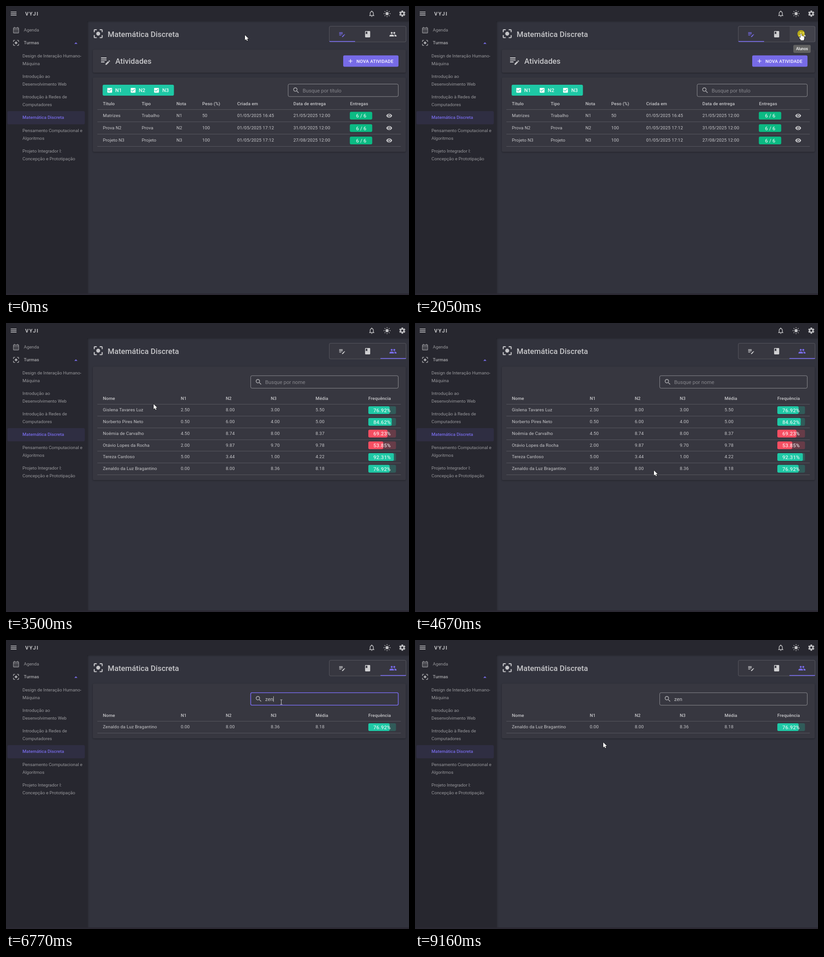
An HTML page with a canvas that plays this animation: 882 by 635 pixels, repeating every 9.2 s.

```html
<!DOCTYPE html>
<html lang="pt-BR">
<head>
<meta charset="utf-8">
<title>Matemática Discreta</title>
<style>
html, body { margin: 0; width: 100%; height: 100%; overflow: hidden; background: #32333d; }
canvas { display: block; }
</style>
</head>
<body>
<canvas id="stage" width="882" height="635"></canvas>
<script>
const ctx = document.getElementById('stage').getContext('2d');
const LOOP = 9200;
const BG = '#32333d', DARK = '#27272f', SURFACE = '#373740';
const PRIMARY = '#776be7', TEAL = '#1ec8a5', RED = '#f64e62', GREEN = '#0bba83';
const white = a => `rgba(255,255,255,${a})`;
const TEXT = white(.72), MUTED = white(.52), LINE = white(.16);

const ICONS = {
  menu: 'M3 18h18v-2H3zM3 13h18v-2H3zM3 6v2h18V6z',
  bell: 'M12 22c1.1 0 2-.9 2-2h-4c0 1.1.9 2 2 2zm6-6v-5c0-3.07-1.63-5.64-4.5-6.32V4c0-.83-.67-1.5-1.5-1.5s-1.5.67-1.5 1.5v.68C7.64 5.36 6 7.92 6 11v5l-2 2v1h16v-1l-2-2zm-2 1H8v-6c0-2.48 1.51-4.5 4-4.5s4 2.02 4 4.5v6z',
  calendar: 'M19 4h-1V2h-2v2H8V2H6v2H5c-1.1 0-2 .9-2 2v14c0 1.1.9 2 2 2h14c1.1 0 2-.9 2-2V6c0-1.1-.9-2-2-2zm0 16H5V10h14zM5 8V6h14v2zM7 12h2v2H7zM11 12h2v2h-2zM15 12h2v2h-2zM7 16h2v2H7zM11 16h2v2h-2zM15 16h2v2h-2z',
  focus: 'M12 8c-2.21 0-4 1.79-4 4s1.79 4 4 4 4-1.79 4-4-1.79-4-4-4zm-7 7H3v4c0 1.1.9 2 2 2h4v-2H5zM5 5h4V3H5c-1.1 0-2 .9-2 2v4h2zm14-2h-4v2h4v4h2V5c0-1.1-.9-2-2-2zm0 16h-4v2h4c1.1 0 2-.9 2-2v-4h-2z',
  note: 'M3 10h11v2H3zM3 8h11V6H3zM3 16h7v-2H3zM18.01 12.87l.71-.71c.39-.39 1.02-.39 1.41 0l.71.71c.39.39.39 1.02 0 1.41l-.71.71zM17.3 13.58l-5.3 5.3V21h2.12l5.3-5.3z',
  book: 'M18 2H6c-1.1 0-2 .9-2 2v16c0 1.1.9 2 2 2h12c1.1 0 2-.9 2-2V4c0-1.1-.9-2-2-2zM6 4h5v8l-2.5-1.5L6 12z',
  people: 'M16 11c1.66 0 3-1.34 3-3s-1.34-3-3-3-3 1.34-3 3 1.34 3 3 3zm-8 0c1.66 0 3-1.34 3-3S9.66 5 8 5 5 6.34 5 8s1.34 3 3 3zm0 2c-2.33 0-7 1.17-7 3.5V19h14v-2.5c0-2.33-4.67-3.5-7-3.5zm8 0c-.29 0-.62.02-.97.05 1.16.84 1.97 1.97 1.97 3.45V19h6v-2.5c0-2.33-4.67-3.5-7-3.5z',
  search: 'M15.5 14h-.79l-.28-.27C15.41 12.59 16 11.11 16 9.5 16 5.91 13.09 3 9.5 3S3 5.91 3 9.5 5.91 16 9.5 16c1.61 0 3.09-.59 4.23-1.57l.27.28v.79l5 4.99L20.49 19zm-6 0C7.01 14 5 11.99 5 9.5S7.01 5 9.5 5 14 7.01 14 9.5 11.99 14 9.5 14z',
  eye: 'M12 4.5C7 4.5 2.73 7.61 1 12c1.73 4.39 6 7.5 11 7.5s9.27-3.11 11-7.5c-1.73-4.39-6-7.5-11-7.5zM12 17c-2.76 0-5-2.24-5-5s2.24-5 5-5 5 2.24 5 5-2.24 5-5 5zm0-8c-1.66 0-3 1.34-3 3s1.34 3 3 3 3-1.34 3-3-1.34-3-3-3z',
  check: 'M19 3H5c-1.1 0-2 .9-2 2v14c0 1.1.9 2 2 2h14c1.1 0 2-.9 2-2V5c0-1.1-.9-2-2-2zm-9 14l-5-5 1.41-1.41L10 14.17l7.59-7.59L19 8z',
  plus: 'M19 13h-6v6h-2v-6H5v-2h6V5h2v6h6z',
  up: 'M7 14.5l5-5 5 5z',
  arrow: 'M0 0V11.2L2.6 8.8 4.3 12.6 6.2 11.8 4.5 8.1H8z',
  hand: 'M-1.3 1.2C-1.3-.4 1.1-.4 1.1 1.2V5C1.3 4.2 3.2 4.3 3.3 5.4 3.7 4.7 5.2 4.9 5.3 6 5.8 5.4 7 5.8 7 6.8V10C7 12 6 12.6 5.8 14.6H-.6C-.8 12.8-3 11-4 9-4.4 7.8-2.6 7.2-1.3 9z'
};
for (const k in ICONS) ICONS[k] = new Path2D(ICONS[k]);

// [time, x, y]
const PATH = [
  [0, 523, 64], [40, 523, 64], [250, 640, 69], [400, 752, 70], [600, 818.5, 66.5], [760, 838, 63], [930, 845, 61],
  [2810, 845, 61], [3100, 750, 110], [3400, 420, 165], [3690, 213, 191], [3950, 460, 163], [4120, 770, 163],
  [4230, 836, 185], [4400, 690, 262], [4560, 546, 314], [4670, 523, 324],
  [4800, 523, 324], [5000, 545, 270], [5200, 592, 160], [5360, 603, 136],
  [6750, 603, 136], [7000, 480, 162], [7250, 265, 190], [7450, 203, 192],
  [7640, 203, 192], [7900, 235, 189], [8270, 309, 185], [8550, 350, 185], [8670, 355, 186],
  [9100, 355, 186], [9130, 384, 206], [9160, 412, 225], [9200, 412, 225]
];
const PRESSES = [[2050, 2130], [5400, 5470], [7660, 8570], [8880, 8920]];
const SWITCH = 2095, FOCUS = 5400, BLUR = 7660, CLEAR = 8880;
const TABS = [['note', 735.5, ''], ['book', 791.5, 'Frequência'], ['people', 847, 'Alunos']];

const TASKS = [
  ['Matrizes', 'Trabalho', 'N1', '50', '01/05/2025 16:45', '21/05/2025 12:00'],
  ['Prova N2', 'Prova', 'N2', '100', '01/05/2025 17:12', '31/05/2025 12:00'],
  ['Projeto N3', 'Projeto', 'N3', '100', '01/05/2025 17:12', '27/08/2025 12:00']
];
const STUDENTS = [
  ['Gislena Tavares Luz', '2.50', '8.00', '3.00', '5.50', 76.92],
  ['Norberto Pires Neto', '0.50', '6.00', '4.00', '5.00', 84.62],
  ['Noêmia de Carvalho', '4.50', '8.74', '8.00', '8.37', 69.23],
  ['Otávio Lopes da Rocha', '2.00', '9.87', '9.70', '9.78', 53.85],
  ['Tereza Cardoso', '5.00', '3.44', '1.00', '4.22', 92.31],
  ['Zenaldo da Luz Bragantino', '0.00', '8.00', '8.36', '8.18', 76.92]
];
const TASK_COLS = [212, 297, 373, 429.5, 506, 629, 753];
const STUDENT_COLS = [212, 382.5, 481, 579.5, 677.5, 793];
let hits = [];

const clamp = v => Math.max(0, Math.min(1, v));

function bezier(p, x1, y1, x2, y2) {
  const at = (s, a, b) => 3 * a * s * (1 - s) ** 2 + 3 * b * s * s * (1 - s) + s ** 3;
  let lo = 0, hi = 1;
  for (let i = 0; i < 20; i++) {
    const mid = (lo + hi) / 2;
    if (at(mid, x1, x2) < p) lo = mid; else hi = mid;
  }
  return at(lo, y1, y2);
}

function pointer(t) {
  let i = 0;
  while (i < PATH.length - 2 && t >= PATH[i + 1][0]) i++;
  const still = (a, b) => a[1] === b[1] && a[2] === b[2];
  const slope = (k, d) => {
    const a = PATH[k - 1], b = PATH[k], c = PATH[k + 1];
    if (!a || !c || still(a, b) || still(b, c)) return 0;
    return (b[d] - a[d]) * (c[d] - b[d]) <= 0 ? 0 : (c[d] - a[d]) / (c[0] - a[0]);
  };
  const a = PATH[i], b = PATH[i + 1], h = b[0] - a[0], u = clamp((t - a[0]) / h);
  return [1, 2].map(d =>
    a[d] * (1 + 2 * u) * (1 - u) ** 2 + b[d] * u * u * (3 - 2 * u) +
    slope(i, d) * h * u * (1 - u) ** 2 - slope(i + 1, d) * h * u * u * (1 - u));
}

function box(x, y, w, h, fill, r = 0) {
  ctx.fillStyle = fill;
  ctx.beginPath();
  ctx.roundRect(x, y, w, h, r);
  ctx.fill();
}

function frame(x, y, w, h, color, width = 1) {
  ctx.strokeStyle = color;
  ctx.lineWidth = width;
  ctx.beginPath();
  ctx.roundRect(x, y, w, h, 3);
  ctx.stroke();
}

function disc(x, y, r, fill) {
  ctx.fillStyle = fill;
  ctx.beginPath();
  ctx.arc(x, y, r, 0, 7);
  ctx.fill();
}

function icon(name, cx, cy, size, color) {
  ctx.save();
  ctx.translate(cx - size / 2, cy - size / 2);
  ctx.scale(size / 24, size / 24);
  ctx.fillStyle = color;
  ctx.fill(ICONS[name], 'evenodd');
  ctx.restore();
}

// y is the middle of the capitals
function text(str, x, y, { size = 9.8, weight = 400, color = TEXT, space = 0 } = {}) {
  ctx.font = `${weight} ${size}px Roboto, sans-serif`;
  ctx.letterSpacing = space + 'px';
  ctx.fillStyle = color;
  ctx.fillText(str, x, y + size * .356);
  return ctx.measureText(str).width;
}

function cell(str, x, y, weight = 400, color = TEXT) {
  const w = text(str, x, y, { weight, color, space: .1 });
  hits.push([x, y, w]);
  return w;
}

function panel(y, h) {
  ctx.save();
  ctx.shadowColor = 'rgba(0,0,0,.35)';
  ctx.shadowBlur = 3;
  ctx.shadowOffsetY = 1;
  box(190, y, 685, h, SURFACE, 3);
  ctx.restore();
}

const rule = y => box(200, y, 664, 1, LINE);

function spokes(cx, cy, n, from, to, width, color) {
  ctx.strokeStyle = color;
  ctx.lineWidth = width;
  ctx.beginPath();
  for (let i = 0; i < n; i++) {
    const a = i * 2 * Math.PI / n, c = Math.cos(a), s = Math.sin(a);
    ctx.moveTo(cx + c * from, cy + s * from);
    ctx.lineTo(cx + c * to, cy + s * to);
  }
  ctx.stroke();
}

function shell() {
  box(0, 0, 882, 635, BG);
  ctx.save();
  ctx.shadowColor = 'rgba(0,0,0,.3)';
  ctx.shadowBlur = 4;
  box(0, 0, 179, 635, DARK);
  box(0, 0, 882, 33.5, DARK);
  ctx.restore();
  box(0, 30, 178, 20, DARK);
  box(0, 631.5, 882, 4, '#2b2933');

  icon('menu', 16.7, 16.8, 16.8, TEXT);
  text('VYJI', 42, 17, { size: 11.2, weight: 700, space: 1.7 });
  icon('bell', 800.5, 16.8, 16.8, TEXT);
  disc(834, 16.8, 3.5, TEXT);
  spokes(834, 16.8, 8, 5.5, 7.5, 1.4, TEXT);
  const gray = '#bfbfc2';
  disc(867.3, 16.8, 5, gray);
  ctx.save();
  ctx.translate(867.3, 16.8);
  ctx.rotate(Math.PI / 6);
  spokes(0, 0, 6, 3, 6.8, 3.7, gray);
  ctx.restore();
  disc(867.3, 16.8, 2.4, DARK);

  icon('calendar', 22, 53, 16.8, MUTED);
  text('Agenda', 39, 53, { color: MUTED });
  icon('focus', 22, 81, 16.8, white(.6));
  text('Turmas', 39, 81, { weight: 500, color: white(.6) });
  icon('up', 153, 81.5, 16.8, PRIMARY);
  box(3, 231, 169.5, 29, 'rgba(119,107,231,.1)', 3);
  const item = (str, y) => text(str, 36, y, { color: MUTED });
  item('Design de Interação Humano-', 109.5);
  item('Máquina', 126.3);
  item('Introdução ao', 154.6);
  item('Desenvolvimento Web', 171.5);
  item('Introdução à Redes de', 200);
  item('Computadores', 216.7);
  text('Matemática Discreta', 36, 245, { weight: 500, color: PRIMARY });
  item('Pensamento Computacional e', 273.3);
  item('Algoritmos', 290.5);
  item('Projeto Integrador I:', 318.5);
  item('Concepção e Prototipação', 335.6);

  icon('focus', 201.8, 60.8, 26, TEXT);
  text('Matemática Discreta', 222.5, 61.8, { size: 16.8, weight: 500 });
}

function tabs(t, hover) {
  const active = t >= SWITCH && t < LOOP ? 2 : 0;
  box(707.5, 44.5, 168, 34.5, SURFACE, 3);
  if (hover >= 0) box(708 + hover * 56, 45, 56, 33.5, white(.055));
  frame(707.5, 44.5, 168, 34.5, white(.16));
  TABS.forEach(([name, x], i) => icon(name, x, 62, 16.8, i === active ? PRIMARY : white(.76)));
  const slide = bezier(clamp((t - SWITCH) / 300), .64, .09, .08, 1);
  box(708 + 111.5 * slide, 77, 56, 1.8, PRIMARY);
  const age = (t - 2050) / 440;
  if (age > 0 && age < 1) {
    disc(845, 62, 4 + 22 * age, white(.13 * (1 - age)));
  }
}

function search(x, y, hint, value, focused, caret) {
  frame(x, y, 858.5 - x, 27.5, focused ? PRIMARY : white(.42), focused ? 1.6 : 1);
  icon('search', x + 17.5, y + 13.8, 16.8, white(.6));
  const w = text(value || hint, x + 31.8, y + 14.2, { size: 11.2, color: value ? TEXT : white(.4) });
  if (caret) box(Math.round(x + 31.8 + (value ? w : 0)), y + 8, 1, 12, TEXT);
}

function tasks() {
  panel(96, 50.5);
  icon('note', 217.8, 119.6, 26, TEXT);
  text('Atividades', 239.3, 121, { size: 16.8, weight: 500 });
  box(738, 108.5, 121, 25, PRIMARY, 3);
  icon('plus', 754, 121, 14.5, '#fff');
  text('NOVA ATIVIDADE', 767, 121.2, { weight: 500, color: '#fff', space: .28 });

  panel(157, 163.5);
  box(211.5, 173, 156, 24, TEAL, 3);
  ['N1', 'N2', 'N3'].forEach((n, i) => {
    icon('check', 227 + i * 51.2, 185.2, 14, '#fff');
    text(n, 239 + i * 51.5, 185.2, { size: 11.2, weight: 500, color: white(.9) });
  });
  search(617.5, 171.5, 'Busque por título', '', false, false);
  ['Título', 'Tipo', 'Nota', 'Peso (%)', 'Criada em', 'Data de entrega', 'Entregas']
    .forEach((s, i) => cell(s, TASK_COLS[i], 214.6, 500));
  rule(227);
  TASKS.forEach((row, i) => {
    const y = 240.6 + i * 27.2;
    row.forEach((s, k) => cell(s, TASK_COLS[k], y));
    box(752.5, y - 8, 49, 17, GREEN, 3);
    text('6 / 6', 766, y + .8, { size: 11.2, weight: 500, color: white(.8) });
    icon('eye', 838.7, y + .4, 14, TEXT);
    rule(Math.round(y + 13.4));
  });
}

// Width of the name up to the letter boundary nearest the pointer
function selectedWidth(name, px) {
  ctx.font = '400 9.8px Roboto, sans-serif';
  ctx.letterSpacing = '0.1px';
  let best = 0;
  for (let n = 1; n <= name.length; n++) {
    const w = ctx.measureText(name.slice(0, n)).width;
    if (Math.abs(212 + w - px) < Math.abs(212 + best - px)) best = w;
  }
  return best;
}

function students(t, px) {
  const query = 'zen'.slice(0, (t >= 5980) + (t >= 6350) + (t >= 6560));
  const filter = t < 6100 ? '' : query;
  const rows = STUDENTS.filter(r => r[0].toLowerCase().includes(filter));
  const focused = t >= FOCUS && t < BLUR;
  const last = t >= 6560 ? 6560 : t >= 6350 ? 6350 : t >= 5980 ? 5980 : FOCUS;

  panel(96, 94.5 + rows.length * 25.8);
  search(535.5, 115.8, 'Busque por nome', query, focused, focused && (t - last) % 1000 < 500);
  ['Nome', 'N1', 'N2', 'N3', 'Média', 'Frequência']
    .forEach((s, i) => cell(s, STUDENT_COLS[i], 165.2, 500));
  rule(178);
  rows.forEach((row, i) => {
    const y = 191 + i * 25.75, rate = row[5];
    row.slice(0, 5).forEach((s, k) => cell(s, STUDENT_COLS[k], y));
    if (t >= BLUR && t < CLEAR) {
      const w = selectedWidth(row[0], px);
      if (w) {
        ctx.save();
        box(212, y - 6.5, w, 13, '#0078d7');
        ctx.beginPath();
        ctx.rect(212, y - 7, w, 14);
        ctx.clip();
        text(row[0], 212, y, { color: '#fff', space: .1 });
        ctx.restore();
      }
    }
    const color = rate < 75 ? RED : TEAL;
    ctx.globalAlpha = .25;
    box(793, y - 8, 60.5, 17, color, 3);
    ctx.globalAlpha = 1;
    box(793, y - 8, 60.5 * rate / 100, 17, color, 3);
    text(rate.toFixed(2) + '%', 804, y + .8, { size: 11.2, weight: 500, color: white(.82), space: .25 });
    rule(Math.round(y + 13));
  });
}

function tooltip(hover) {
  if (hover < 1) return;
  const [, x, label] = TABS[hover], w = hover === 1 ? 54 : 38;
  box(x - w / 2, 85.5, w, 17.5, '#616161', 3);
  ctx.textAlign = 'center';
  text(label, x, 94, { size: 8.4, weight: 500, color: '#fff' });
  ctx.textAlign = 'left';
}

function cursor(t, x, y, hover) {
  if (PRESSES.some(([a, b]) => t >= a && t < b)) disc(x, y, 8, 'rgba(235,215,0,.68)');
  const inField = t >= SWITCH && x > 535 && x < 859 && y > 115 && y < 144;
  const onText = hits.some(([hx, hy, w]) => x >= hx && x <= hx + w && Math.abs(y - hy) < 7);
  const dragging = t >= BLUR && t < 8570;
  if (inField || onText || dragging) {
    const cx = Math.round(x);
    box(cx, y - 5, 1, 10, white(.75));
    box(cx - 2, y - 5.5, 5, 1, white(.6));
    box(cx - 2, y + 4.5, 5, 1, white(.6));
    return;
  }
  const shape = ICONS[hover >= 0 ? 'hand' : 'arrow'];
  ctx.save();
  ctx.translate(x, y);
  ctx.lineWidth = 1.2;
  ctx.lineJoin = 'round';
  ctx.strokeStyle = '#111';
  ctx.stroke(shape);
  ctx.fillStyle = '#fff';
  ctx.fill(shape);
  ctx.restore();
}

function draw(now) {
  const t = now % LOOP;
  const [x, y] = pointer(t);
  const hover = x >= 708 && x < 875 && y > 45 && y < 79 ? Math.floor((x - 708) / 56) : -1;
  hits = [];
  shell();
  tabs(t, hover);
  if (t < SWITCH) tasks(); else students(t, x);
  tooltip(hover);
  cursor(t, x, y, hover);
}

const start = performance.now();
function tick() {
  draw(performance.now() - start);
  requestAnimationFrame(tick);
}
tick();
</script>
</body>
</html>
```
